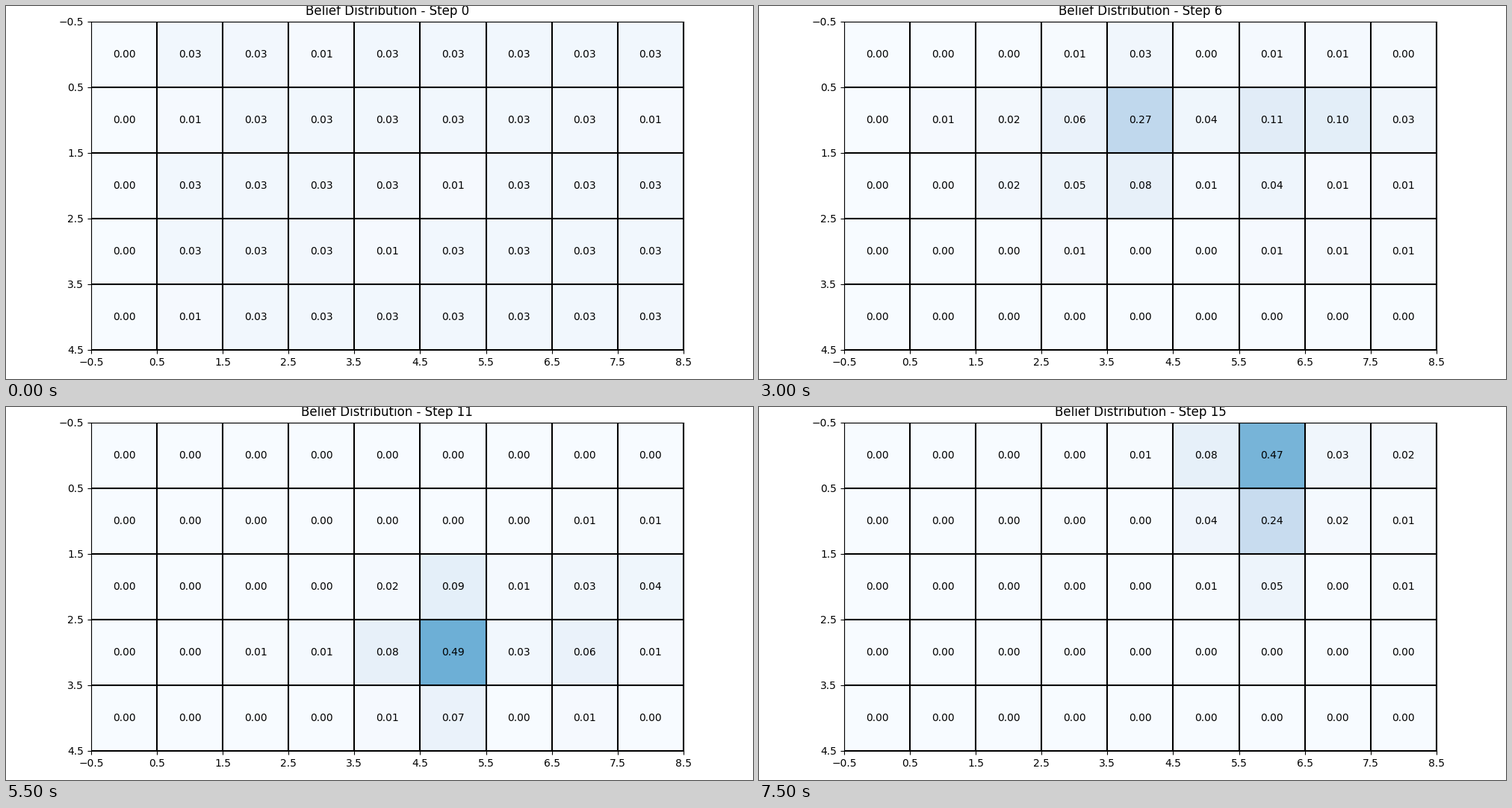
Animation, 1000 px wide and 500 px high, one loop 8000 ms. Source, as a matplotlib script:

```python
import numpy as np
import matplotlib.pyplot as plt
from matplotlib.animation import FuncAnimation

ROWS, COLS = 5, 9
STEPS = 16
MOVE_OK = 0.88      # chance that a move succeeds, otherwise the robot stays
SENSE_OK = 0.8      # sensor likelihood for a matching cell
START = (4, 2)
PATH = "R" + "UUUU" + "R" + "DDDD" + "R" + "UUUU" + "R"
DIRS = {"U": (-1, 0), "D": (1, 0), "L": (0, -1), "R": (0, 1)}


def make_world():
    """Plain floor is 0, the two kinds of landmark are 1 and 2."""
    world = np.zeros((ROWS, COLS), int)
    world[3, 3] = 1
    for cell in [(0, 2), (1, 0), (1, 7), (2, 4), (4, 0), (4, 8)]:
        world[cell] = 2
    return world


def shift(grid, dr, dc):
    """Move the whole grid one cell; what leaves the board is lost."""
    padded = np.pad(grid, 1)
    return padded[1 - dr:1 - dr + ROWS, 1 - dc:1 - dc + COLS]


def run_filter():
    world = make_world()
    belief = np.full((ROWS, COLS), 1 / (ROWS * COLS))
    r, c = START
    history = []
    for move in PATH:
        dr, dc = DIRS[move]
        belief = belief * np.where(world == world[r, c], SENSE_OK, 1 - SENSE_OK)
        belief = MOVE_OK * shift(belief, dr, dc) + (1 - MOVE_OK) * belief
        belief = belief / belief.sum()
        r, c = r + dr, c + dc
        history.append(belief)
    return history


beliefs = run_filter()

fig = plt.figure(figsize=(10, 5), dpi=100)
ax = fig.add_axes([0.11402, 0.078, 0.79272, 0.8808])
image = ax.imshow(beliefs[0], cmap="Blues", vmin=0, vmax=1, aspect="auto")
ax.set_xticks(np.arange(-0.5, COLS, 1))
ax.set_yticks(np.arange(-0.5, ROWS, 1))
ax.set_xlim(-0.5, COLS - 0.5)
ax.set_ylim(ROWS - 0.5, -0.5)
ax.grid(color="black", linestyle="-", linewidth=1.5)
title = ax.set_title("")
labels = {(r, c): ax.text(c, r, "", ha="center", va="center", color="black")
          for r in range(ROWS) for c in range(COLS)}


def draw(step):
    belief = beliefs[step]
    image.set_data(belief)
    title.set_text(f"Belief Distribution - Step {step}")
    for cell, label in labels.items():
        label.set_text(f"{belief[cell]:.2f}")
    return [image, title, *labels.values()]


anim = FuncAnimation(fig, draw, frames=STEPS, init_func=lambda: draw(0),
                     interval=500, repeat=True, repeat_delay=0, blit=False)
plt.show()
```
